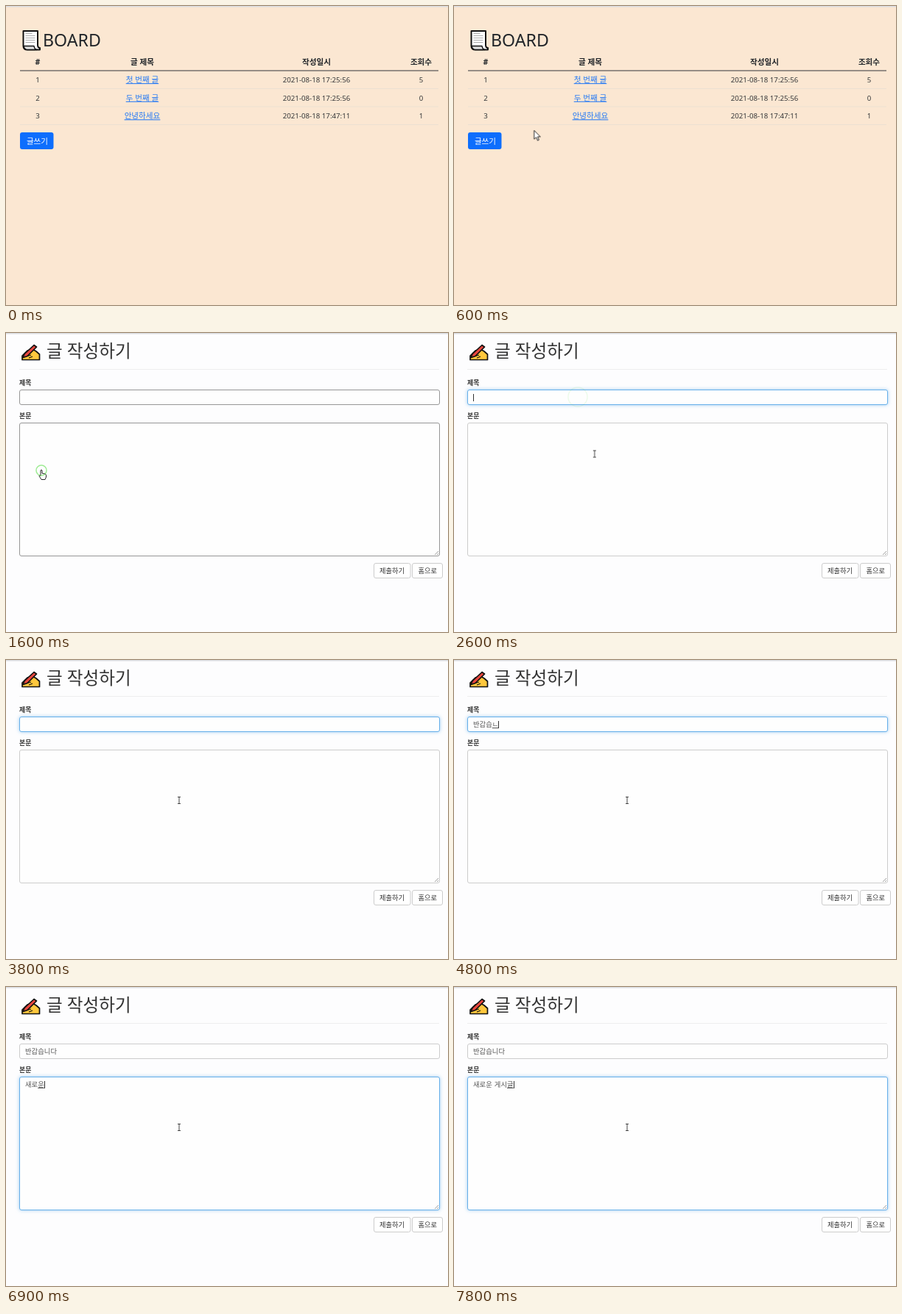
Recreate the animation shown at these times as an HTML page. Size 600 px wide and 407 px high, loop 8 s.

```html
<!DOCTYPE html>
<html lang="ko">
<head>
<meta charset="utf-8">
<title>Board</title>
<style>
html, body { margin: 0; width: 100%; height: 100%; overflow: hidden; }
body { font-family: 'Noto Sans', 'Noto Sans CJK KR', sans-serif; }
#stage { position: relative; width: 600px; height: 407px; overflow: hidden; background: #fdfdfe; }
svg { position: absolute; left: 0; top: 0; }
#stage *, #stage { animation-duration: 8s; animation-iteration-count: infinite; animation-timing-function: linear; }

/* list page */
#list { animation-name: list; animation-timing-function: step-end; }
#list text { font-size: 10.6px; fill: #212529; text-anchor: middle; }
#list .num { font-size: 9.7px; fill: #343638; }
#list .link { fill: #2479f4; text-decoration: underline; }
#list .head { font-weight: 700; }
#list .logo { font-size: 23.2px; text-anchor: start; }
#list .label { fill: #fff; }
#write { fill: #0d6efd; animation-name: write; }
@keyframes list { 0% { visibility: visible } 19.75%, 100% { visibility: hidden } }
@keyframes write {
  0%, 8.5% { fill: #0d6efd } 10%, 17% { fill: #0b5ed7 } 18%, 100% { fill: #0a5ad0 }
}

/* form page */
#form text { font-size: 9.25px; fill: #333; }
#form .title { font-size: 23.6px; font-weight: 300; }
#form .label { font-size: 8.9px; font-weight: 700; }
#form .button { fill: #fff; stroke: #ccc; }
.field {
  position: absolute; left: 18px; width: 571px; box-sizing: border-box; padding-left: 7px;
  border: 1px solid #ccc; border-radius: 3px; background: #fefefe;
  font-size: 9.35px; line-height: 19px; color: #555; white-space: pre; word-spacing: .6px;
}
#subject { top: 77px; height: 21px; animation-name: subject; }
#content { top: 122px; height: 182px; animation-name: content; }
.field u { text-underline-offset: 1px; }
.field i { display: inline-block; width: 1px; height: 10px; margin-right: -1px; background: #333; vertical-align: -1.5px; }
@keyframes subject {
  0%, 19.7% { border-color: #8f8f8f; box-shadow: none }
  22.5%, 27.9% { border-color: #ccc; box-shadow: 0 0 5px #66afe900 }
  29.8%, 67.3% { border-color: #66afe9; box-shadow: 0 0 5px #66afe999 }
  69.5%, 100% { border-color: #ccc; box-shadow: 0 0 5px #66afe900 }
}
@keyframes content {
  0%, 19.7% { border-color: #8f8f8f; box-shadow: none }
  22.5%, 67.3% { border-color: #ccc; box-shadow: 0 0 5px #66afe900 }
  69.5%, 100% { border-color: #66afe9; box-shadow: 0 0 5px #66afe999 }
}

/* pointer */
#pointer { animation-name: move; }
#arrow { animation-name: arrow; animation-timing-function: step-end !important; }
#hand { animation-name: hand; animation-timing-function: step-end !important; }
#beam { animation-name: beam; animation-timing-function: step-end !important; }
@keyframes move {
  0%, 1.25% { transform: translate(564px, 44px); animation-timing-function: ease-out }
  10%, 26.5% { transform: translate(48px, 186px) }
  27.75%, 29.4% { transform: translate(168px, 87px) }
  32.4% { transform: translate(189px, 163.5px); animation-timing-function: ease-out }
  37.3%, 100% { transform: translate(235px, 191px) }
}
@keyframes arrow { 0% { opacity: 0 } 1.2% { opacity: 1 } 8.7%, 100% { opacity: 0 } }
@keyframes hand { 0% { opacity: 0 } 8.7% { opacity: 1 } 27.2%, 100% { opacity: 0 } }
@keyframes beam { 0% { opacity: 0 } 27.2%, 100% { opacity: 1 } }

.ripple { fill: none; stroke: #4fdc3c; opacity: 0; animation-name: ripple; }
@keyframes ripple {
  0% { r: 1px; opacity: 1; stroke-width: 3px }
  1.25% { r: 4px; opacity: .95; stroke-width: 2.5px }
  2.5% { r: 7px; opacity: .55; stroke-width: 1.5px }
  4.6% { r: 13px; opacity: .1; stroke-width: 1.5px }
  6%, 100% { r: 15px; opacity: 0 }
}
</style>
</head>
<body>
<div id="stage">
  <div id="form">
    <svg width="600" height="407">
      <g stroke="#111" stroke-width="1.7" stroke-linejoin="round">
        <path fill="#ffc83d" d="M22 36.5V31l7-7 7-2 5 3 4.5 4v7.5Z"/>
        <path fill="#e8473f" d="M23 33.5l2-5L38 16.5l3.5 2.5L29 31.5Z"/>
        <path fill="none" stroke-width="1.2" d="M29 31.5l5-1.5M31 34l5-2"/>
      </g>
      <text class="title" x="55" y="33">글 작성하기</text>
      <path stroke="#eee" d="M18 49.5H588"/>
      <text class="label" x="18" y="70.5">제목</text>
      <text class="label" x="18" y="115.5">본문</text>
      <rect class="button" x="499.5" y="313.5" width="49.5" height="20" rx="2.5"/>
      <rect class="button" x="551.5" y="313.5" width="41" height="20" rx="2.5"/>
      <text x="507" y="326.5">제출하기</text>
      <text x="559.5" y="326.5">홈으로</text>
    </svg>
    <div class="field" id="subject"><span></span><u></u><i></i></div>
    <div class="field" id="content"><span></span><u></u><i></i></div>
    <svg width="600" height="407"><path stroke="#888" stroke-width=".8" d="M582 302l5-5M585 302l2-2"/></svg>
  </div>

  <svg id="list" width="600" height="407">
    <rect width="600" height="407" fill="#fbe7d2"/>
    <g stroke="#111" stroke-width="2" stroke-linejoin="round">
      <path fill="#fff" d="M23.5 34H43V53q0 4 3 4v2.500H29q-5.500 0-5.500-5Z"/>
      <path fill="#ddd" d="M24 54.500H38q1 5 4 5H29q-4 0-5-5Z" stroke-width="1.300"/>
      <path stroke="#aaa" stroke-width="1" d="M26.500 37.500h9M26.500 40.500h13M26.500 43.500h13M26.500 46.500h13M26.500 49.500h13"/>
    </g>
    <text class="logo" x="50" y="54.500">BOARD</text>
    <g id="table"></g>
    <path stroke="#33343a" d="M19 88H587"/>
    <path stroke="#e9dfd2" stroke-width=".8" d="M19 112.500H587M19 137H587M19 161.500H587"/>
    <rect id="write" x="19" y="172" width="45.500" height="23" rx="3"/>
    <text class="label" x="42.500" y="187.500">글쓰기</text>
  </svg>

  <svg width="600" height="407">
    <path fill="#dcdde2" d="M0 0H600V1.400H0Z"/>
    <g id="pointer" stroke="#111" stroke-width=".9" stroke-linejoin="round">
      <path id="arrow" fill="#fff" d="M0 0V12l2.800-2.500 1.900 4.300 1.900-.8-1.900-4.200H8.500Z"/>
      <path id="hand" fill="#fff" d="M-1 1q1-1.500 2 0V5l4 .8q1.500.4 1.500 2V10L5 13.500H0L-3 8.500q0-1.500 2-.3Z"/>
      <path id="beam" fill="none" stroke="#333" d="M-2-4.500H2M0-4.500V4.500M-2 4.500H2"/>
    </g>
    <circle class="ripple" cx="48" cy="187" style="animation-delay: 1.4s"/>
    <circle class="ripple" cx="168" cy="87" style="animation-delay: 2.23s"/>
  </svg>
</div>
<script>
const LOOP = 8000, LEAD = 15;
const columns = [43, 185, 421.5, 563.5];
const cellClasses = ['num', 'link', 'num', 'num'];
const rows = [
  ['#', '글 제목', '작성일시', '조회수'],
  ['1', '첫 번째 글', '2021-08-18 17:25:56', '5'],
  ['2', '두 번째 글', '2021-08-18 17:25:56', '0'],
  ['3', '안녕하세요', '2021-08-18 17:47:11', '1'],
];
document.getElementById('table').innerHTML = rows.map((row, r) => row.map((cell, c) =>
  `<text class="${r ? cellClasses[c] : 'head'}" x="${columns[c]}" y="${79.5 + r * 24.6}">${cell}</text>`
).join('')).join('');

// Keys are tenths of a second; the last syllable is still being composed.
const fields = [
  {
    id: 'subject', commit: 5400, caret: [[2280, 2800], [3300, 3800], [3900, 5400]],
    steps: {
      39: 'ㅂ', 40: '바', 41: '반', 43: '반ㄱ', 44: '반가', 45: '반갑', 46: '반갑스',
      47: '반갑습', 48: '반갑습ㄴ', 49: '반갑습니', 50: '반갑습닏', 51: '반갑습니다',
    },
  },
  {
    id: 'content', commit: LOOP, caret: [[5500, 6000], [6300, LOOP + LEAD]],
    steps: {
      63: 'ㅅ', 64: '새', 65: '샐', 66: '새로', 67: '새롱', 68: '새로우', 69: '새로운',
      71: '새로운 ', 72: '새로운 ㄱ', 73: '새로운 게', 75: '새로운 겟',
      76: '새로운 게시', 77: '새로운 게시그', 78: '새로운 게시글',
    },
  },
];
for (const field of fields) {
  [field.text, field.mark, field.bar] = document.getElementById(field.id).children;
}

function drawField({ steps, commit, caret, text, mark, bar }, t) {
  let typed = '';
  for (const key in steps) if (key * 100 <= t) typed = steps[key];
  const composing = typed && t < commit && !typed.endsWith(' ') ? 1 : 0;
  const split = typed.length - composing;
  text.textContent = typed.slice(0, split);
  mark.textContent = typed.slice(split);
  bar.style.opacity = caret.some(([from, to]) => t >= from && t < to) ? 1 : 0;
}

let start;
function frame(now) {
  start ??= now;
  const t = (now - start) % LOOP + LEAD;
  fields.forEach(field => drawField(field, t));
  requestAnimationFrame(frame);
}
requestAnimationFrame(frame);
</script>
</body>
</html>
```
